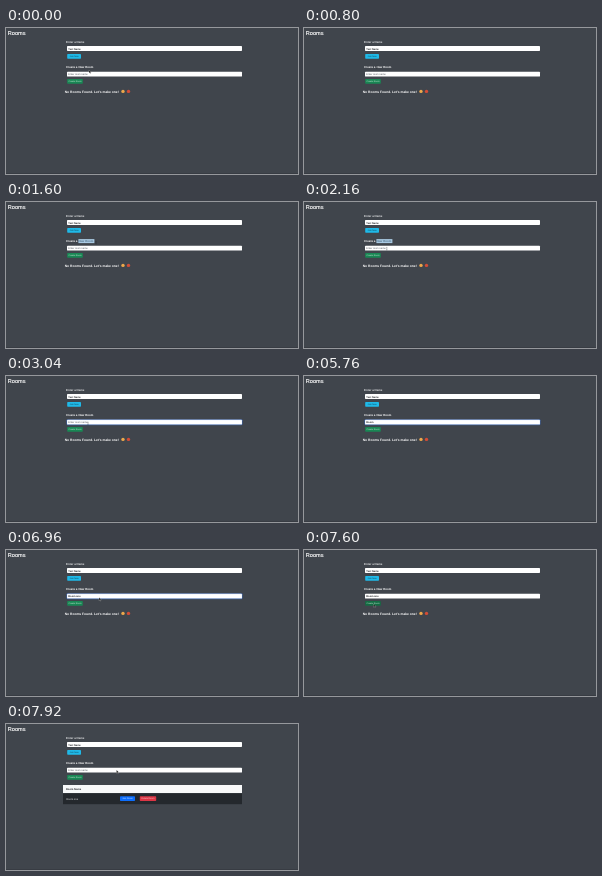
These frames come from a looping animation (292 by 146 pixels, 8000 ms). An HTML page:

```html
<!DOCTYPE html>
<html lang="en">
<head>
<meta charset="utf-8">
<title>Rooms</title>
<style>
html, body { margin: 0; width: 100%; height: 100%; overflow: hidden; background: #40454c; }
svg { display: block; width: 100vw; height: 100vh; }
text { font-family: "Liberation Sans", Arial, sans-serif; text-rendering: geometricPrecision; white-space: pre; }
</style>
</head>
<body>
<svg id="stage" viewBox="0 0 292 146"></svg>
<script>
const LOOP = 8000, STEP = 80;
const stage = document.getElementById("stage");

function add(tag, attrs, parent = stage) {
  const node = document.createElementNS("http://www.w3.org/2000/svg", tag);
  for (const key in attrs) node.setAttribute(key, attrs[key]);
  return parent.appendChild(node);
}
const rect = (x, y, width, height, fill, rx = 0, parent = stage) =>
  add("rect", { x, y, width, height, fill, rx }, parent);
function label(x, y, size, fill, content, parent = stage, weight = 400) {
  const node = add("text", { x, y, "font-size": size, fill, "font-weight": weight }, parent);
  node.textContent = content;
  return node;
}
function button(x, y, width, fill, ink, content, parent = stage) {
  const box = rect(x, y, width, 4.7, fill, 0.7, parent);
  const caption = label(x + width / 2, y + 3.2, 2.2, ink, content, parent);
  caption.setAttribute("text-anchor", "middle");
  return box;
}
const show = (node, on) => node.setAttribute("visibility", on ? "visible" : "hidden");

rect(0, 0, 292, 146, "#40454c");
rect(0, 145.2, 292, 0.8, "#363a41");
const heading = label(1.8, 7.3, 5.6, "#fff", "Rooms");
heading.setAttribute("stroke", "#fff");
heading.setAttribute("stroke-width", 0.15);

label(60, 14.6, 2.9, "#dcdee0", "Enter a Name", stage, 700);
rect(61, 18.1, 175, 4.9, "#fff", 0.7);
label(62.3, 21.5, 2.5, "#25282d", "Test Name", stage, 700);
button(61.2, 26, 13.8, "#1fb9e8", "#123f50", "Join Now");

const selection = rect(72.4, 37.1, 0, 4, "#a9c9e2");
label(60, 40.2, 2.9, "#fff", "Create a ", stage, 700);
const selectable = label(72.4, 40.2, 2.9, "#fff", "New Room", stage, 700);
const ring = rect(60.4, 43.2, 176.2, 6, "#335087", 1.1);
const field = rect(61, 43.8, 175, 4.8, "#fff", 0.7);
const entry = label(62.3, 47.1, 2.5, "#25282d", "");
const createButton = button(61.2, 51, 15.6, "#198754", "#d3eadf", "Create Room");

const empty = add("g", {});
label(58.7, 64.7, 3.3, "#fff", "No Rooms Found. Let's make one!", empty, 700);
add("circle", { cx: 117, cy: 63.4, r: 1.7, fill: "#eda84b" }, empty);
add("circle", { cx: 122.5, cy: 63.4, r: 1.7, fill: "#d34c36" }, empty);

const table = add("g", {});
rect(57, 61, 179, 8.2, "#f8f9fa", 0, table);
label(60, 66.2, 2.6, "#212529", "Room Name", table, 700);
rect(57, 69.2, 179, 11, "#24282d", 0, table);
label(60.2, 75.6, 2.6, "#e5e7e9", "Room one", table);
button(114, 72.2, 15, "#0d6efd", "#dbe8ff", "Join Room", table);
button(133.8, 72.2, 16.4, "#dc3545", "#f6d5d8", "Delete Room", table);

const pointer = add("g", {});
const arrow = add("path", { d: "M0 0V3.2L.8 2.5 1.3 3.6 1.8 3.4 1.3 2.3H2.3Z", fill: "#111", stroke: "#fff", "stroke-width": 0.2 }, pointer);
const beam = add("path", { d: "M-.4-1.3H.4M0-1.3V1.3M-.4 1.3H.4", fill: "none", stroke: "#15181c", "stroke-width": 0.3 }, pointer);

// Each stop: time, x, y
const path = [
  [0, 83, 42], [80, 83, 42], [560, 75, 40], [880, 72.4, 39.2], [960, 72.4, 39.2],
  [1600, 90, 40.5], [1840, 90, 40.5], [2240, 82, 47.4], [6880, 82, 47.4],
  [6960, 93, 47.5], [7520, 69.5, 54], [7680, 69.5, 54], [7760, 75, 50],
  [7840, 95, 43], [7920, 110.5, 46], [8000, 110.5, 46]
];
const typing = [
  [4640, "R"], [4880, "Ro"], [4960, "Roo"], [5760, "Room"],
  [6000, "Room o"], [6080, "Room on"], [6400, "Room one"]
];

function pointerAt(t) {
  const i = path.findIndex(stop => stop[0] > t);
  const [t0, x0, y0] = path[i - 1], [t1, x1, y1] = path[i];
  const p = (t - t0) / (t1 - t0), e = p * p * (3 - 2 * p);
  return [x0 + (x1 - x0) * e, y0 + (y1 - y0) * e];
}

function draw(time) {
  const t = Math.floor((time % LOOP) / STEP) * STEP;
  const [x, y] = pointerAt(t);
  const created = t >= 7760;
  const selected = t >= 960 && t < 2240;
  const focused = t >= 2240 && t < 7600;

  show(selection, selected);
  const reach = t < 1600 ? x - 72.4 : 16;
  selection.setAttribute("width", Math.max(0, Math.min(16, reach)));
  selectable.setAttribute("fill", selected && x > 80 ? "#57758c" : "#fff");

  show(ring, focused);
  field.setAttribute("stroke", focused ? "#86b7fe" : "none");
  field.setAttribute("stroke-width", 0.2);

  const typed = typing.filter(([at]) => t >= at).pop();
  const filled = typed && !created;
  entry.textContent = filled ? typed[1] : "Enter room name";
  entry.setAttribute("fill", filled ? "#15181c" : "#4a4f56");
  entry.setAttribute("font-weight", filled ? 700 : 400);
  createButton.setAttribute("fill", t >= 7440 && t < 7760 ? "#146c43" : "#198754");

  show(empty, !created);
  show(table, created);

  const overText = (y > 43 && y < 49) || (t >= 560 && t < 2240);
  const visible = t < 4640 || t >= 6960;
  pointer.setAttribute("transform", `translate(${x} ${y})`);
  show(beam, visible && overText && t < 6960);
  show(arrow, visible && (!overText || t >= 6960));
}

const start = performance.now();
function tick(now) {
  draw(Math.max(0, now - start));
  requestAnimationFrame(tick);
}
tick(start);
</script>
</body>
</html>
```
